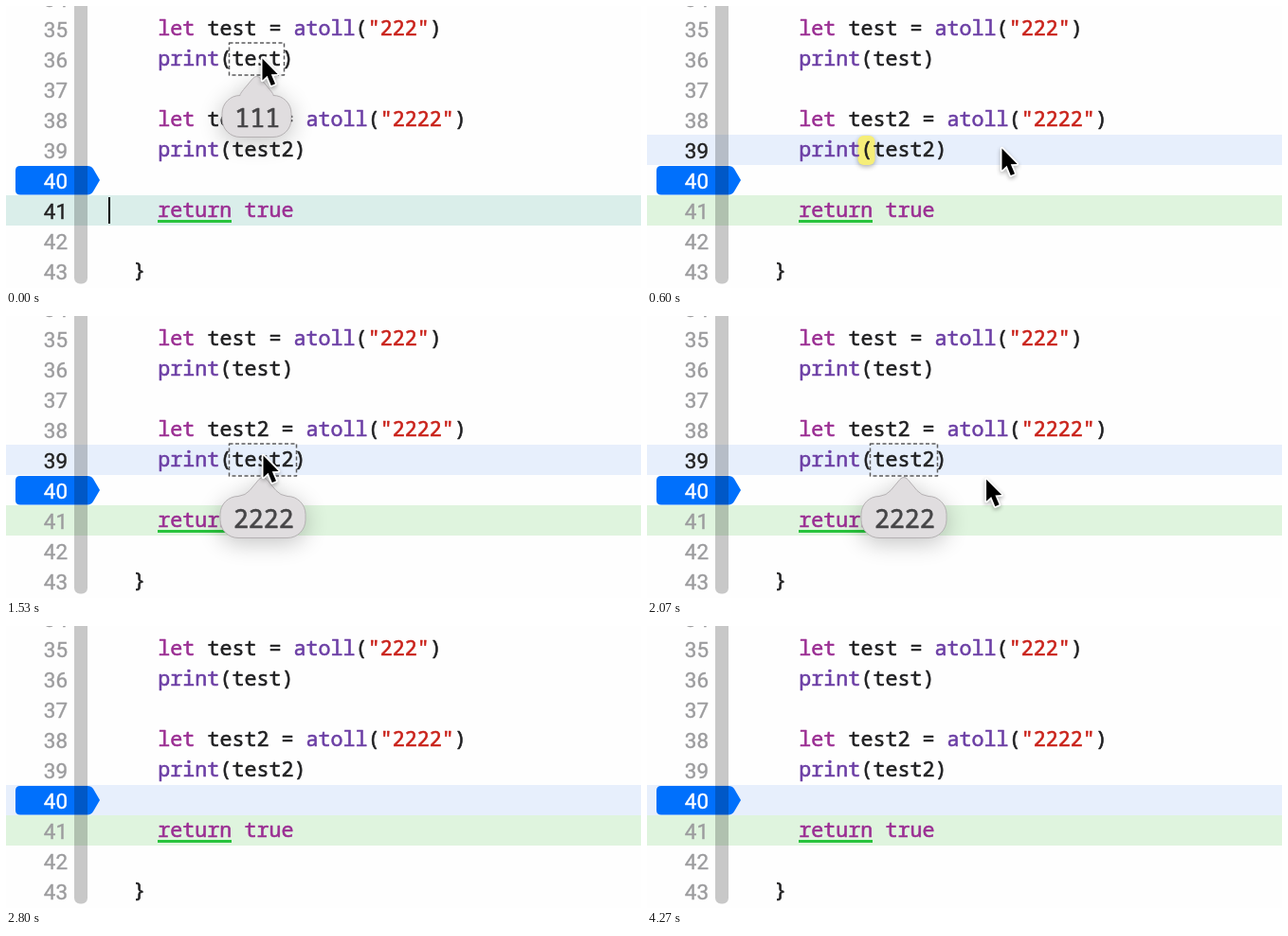
An HTML page with a canvas for the animation above (4.31 s loop, 670 by 298 pixels).

```html
<!DOCTYPE html>
<html lang="en">
<head>
<meta charset="utf-8">
<title>Editor data tips</title>
<style>
html, body { margin: 0; width: 100%; height: 100%; overflow: hidden; background: #fefefe; }
canvas { display: block; }
</style>
</head>
<body>
<canvas id="stage" width="670" height="298"></canvas>
<script>
const ctx = document.getElementById('stage').getContext('2d');
const W = 670, H = 298, LOOP = 4310;
const ROW = 32, CHAR = 13.02, LEFT = 160.3;
const MONO = '"Noto Sans Mono", "DejaVu Sans Mono", monospace';
const KEY = '#9b2f93', CALL = '#6c3fa5', STR = '#c9221a', INK = '#202022';

// Each code row: [column, colour, text] runs
const code = {
  35: [[0, KEY, 'let'], [4, INK, 'test ='], [11, CALL, 'atoll'], [16, INK, '('], [17, STR, '"222"'], [22, INK, ')']],
  36: [[0, CALL, 'print'], [5, INK, '(test)']],
  38: [[0, KEY, 'let'], [4, INK, 'test2 ='], [12, CALL, 'atoll'], [17, INK, '('], [18, STR, '"2222"'], [24, INK, ')']],
  39: [[0, CALL, 'print'], [5, INK, '(test2)']],
  41: [[0, KEY, 'return'], [7, KEY, 'true']],
  43: [[-2, INK, '}']]
};

// Pointer path: time, x, y
const path = [
  [0, 270, 55], [60, 270, 55], [330, 346, 125.5], [440, 374, 150], [640, 374, 150],
  [960, 271, 147], [1850, 271, 147], [2290, 443, 197], [2700, 443, 197]
];
const clicks = [[430, 600], [2330, 2560]];
const SELECT_39 = 520, SELECT_40 = 2430;
const TIP_1_END = 430, TIP_2_START = 1270, TIP_2_END = 2330;
const BEAM = [720, 1250], BRACKET_END = 1090, POINTER_END = 2700, CARET_END = 200;

const within = (t, [a, b]) => t >= a && t < b;
const rowTop = n => (n - 35) * ROW + 8;

function pointerAt(t) {
  let i = 0;
  while (i < path.length - 2 && t >= path[i + 1][0]) i++;
  const [t0, x0, y0] = path[i], [t1, x1, y1] = path[i + 1];
  const k = Math.min(1, (t - t0) / (t1 - t0));
  const e = k * k * (3 - 2 * k);
  return [x0 + (x1 - x0) * e, y0 + (y1 - y0) * e];
}

// A thin outline gives the medium weight between regular and bold
function label(text, x, y, font, color, align = 'left', outline = 0.6) {
  ctx.font = font;
  ctx.fillStyle = ctx.strokeStyle = color;
  ctx.lineWidth = outline;
  ctx.lineJoin = 'round';
  ctx.textAlign = align;
  ctx.fillText(text, x, y);
  ctx.strokeText(text, x, y);
}

function band(n, color) {
  ctx.fillStyle = color;
  ctx.fillRect(0, rowTop(n), W, ROW);
}

function pill(x, y, w, h, r, color) {
  ctx.beginPath();
  ctx.roundRect(x, y, w, h, r);
  ctx.fillStyle = color;
  ctx.fill();
}

function breakpoint() {
  ctx.beginPath();
  ctx.moveTo(15, 169);
  ctx.lineTo(86, 169);
  ctx.quadraticCurveTo(90, 169, 92, 172);
  ctx.lineTo(99, 184);
  ctx.lineTo(92, 196);
  ctx.quadraticCurveTo(90, 199.4, 86, 199.4);
  ctx.lineTo(15, 199.4);
  ctx.quadraticCurveTo(10, 199.4, 10, 194.4);
  ctx.lineTo(10, 174);
  ctx.quadraticCurveTo(10, 169, 15, 169);
  ctx.fillStyle = '#0070fc';
  ctx.fill();
}

function gutter(current) {
  breakpoint();
  pill(72, -10, 14, 303.5, 6, 'rgba(0,0,0,.21)');
  for (let n = 34; n <= 43; n++) {
    const color = n === 40 ? '#fff' : n === current ? '#222' : '#9c9c9e';
    label(n, 65, rowTop(n) + 25, '400 22.4px Roboto, sans-serif', color, 'right', 0.4);
  }
}

function listing() {
  for (const n in code)
    for (const [col, color, text] of code[n])
      label(text, LEFT + col * CHAR, rowTop(n) + 23.4, `500 21.7px ${MONO}`, color);
  ctx.fillStyle = '#28c33c';
  ctx.fillRect(160, 226, 78, 3);
}

function dataTip(text, row, x, w, alpha) {
  const boxY = rowTop(row) - 1;
  const cx = x + w / 2, tip = boxY + 34.5, top = tip + 20, bottom = tip + 65;
  const half = text.length * 8.5 + 11, r = 19;
  ctx.save();
  ctx.globalAlpha = alpha;

  ctx.strokeStyle = '#5c5c5e';
  ctx.lineWidth = 1.5;
  ctx.setLineDash([4, 2.5]);
  ctx.strokeRect(x, boxY, w, 34);
  ctx.setLineDash([]);

  ctx.beginPath();
  ctx.moveTo(cx - 4, tip + 3);
  ctx.quadraticCurveTo(cx, tip - 1, cx + 4, tip + 3);
  ctx.lineTo(cx + 14, top - 5);
  ctx.quadraticCurveTo(cx + 18, top, cx + half - r, top + 1);
  ctx.arcTo(cx + half, top + 1, cx + half, top + r, r);
  ctx.arcTo(cx + half, bottom, cx + half - r, bottom, r);
  ctx.lineTo(cx - half + r, bottom);
  ctx.arcTo(cx - half, bottom, cx - half, bottom - r, r);
  ctx.arcTo(cx - half, top + 1, cx - half + r, top + 1, r);
  ctx.quadraticCurveTo(cx - 18, top, cx - 14, top - 5);
  ctx.closePath();
  ctx.shadowColor = 'rgba(0,0,0,.24)';
  ctx.shadowBlur = 24;
  ctx.shadowOffsetY = 5;
  ctx.fillStyle = '#e0dddf';
  ctx.fill();
  ctx.shadowColor = 'transparent';
  ctx.strokeStyle = '#b5b1b3';
  ctx.lineWidth = 1;
  ctx.stroke();
  label(text, cx + 0.8, tip + 54.8, `500 26.6px ${MONO}`, '#464547', 'center');
  ctx.restore();
}

function arrow(x, y) {
  ctx.save();
  ctx.translate(x, y);
  ctx.beginPath();
  [[0.5, 0.5], [0.5, 23.5], [5.6, 18.8], [9.8, 29], [14, 27.2], [9.8, 17.3], [16.6, 16.9]]
    .forEach(p => ctx.lineTo(...p));
  ctx.closePath();
  ctx.lineJoin = 'round';
  ctx.shadowColor = 'rgba(0,0,0,.3)';
  ctx.shadowBlur = 4;
  ctx.shadowOffsetY = 2;
  ctx.strokeStyle = '#fff';
  ctx.lineWidth = 3.5;
  ctx.stroke();
  ctx.shadowColor = 'transparent';
  ctx.fillStyle = '#000';
  ctx.fill();
  ctx.restore();
}

function beam(x, y) {
  ctx.beginPath();
  for (const s of [-1, 1]) {
    ctx.moveTo(x - 6, y + s * 14);
    ctx.quadraticCurveTo(x, y + s * 14, x, y + s * 9);
    ctx.quadraticCurveTo(x, y + s * 14, x + 6, y + s * 14);
  }
  ctx.moveTo(x, y - 10);
  ctx.lineTo(x, y + 10);
  ctx.moveTo(x - 3.5, y + 5);
  ctx.lineTo(x + 3.5, y + 5);
  for (const [color, width] of [['#fff', 4.5], ['#111', 2.2]]) {
    ctx.strokeStyle = color;
    ctx.lineWidth = width;
    ctx.stroke();
  }
}

function ring(x, y) {
  ctx.beginPath();
  ctx.arc(x, y, 43, 0, Math.PI * 2);
  ctx.strokeStyle = '#0c0c0c';
  ctx.lineWidth = 2.8;
  ctx.stroke();
}

function draw(t) {
  const current = t < SELECT_39 ? 41 : t < SELECT_40 ? 39 : 40;
  ctx.fillStyle = '#fefefe';
  ctx.fillRect(0, 0, W, H);
  band(41, current === 41 ? '#daeeea' : '#dff4de');
  if (current !== 41) band(current, '#e7effc');

  gutter(current);
  if (within(t, [SELECT_39, BRACKET_END])) {
    ctx.save();
    ctx.shadowColor = 'rgba(0,0,0,.3)';
    ctx.shadowBlur = 5;
    ctx.shadowOffsetY = 2;
    pill(222.5, 137, 18, 31, 6, '#f6ee78');
    ctx.restore();
  }
  listing();
  if (t < CARET_END) {
    ctx.fillStyle = '#000';
    ctx.fillRect(108, 202, 2, 28);
  }

  if (t < TIP_1_END) dataTip('111', 36, 235.5, 58, 1);
  if (within(t, [TIP_2_START, TIP_2_END]))
    dataTip('2222', 39, 235.5, 71, Math.min(1, (t - TIP_2_START) / 130));

  if (t >= POINTER_END) return;
  const [x, y] = pointerAt(t);
  if (clicks.some(c => within(t, c))) ring(x - 1, y);
  (within(t, BEAM) ? beam : arrow)(x, y);
}

function tick() {
  draw(performance.now() % LOOP);
  requestAnimationFrame(tick);
}
tick();
</script>
</body>
</html>
```
